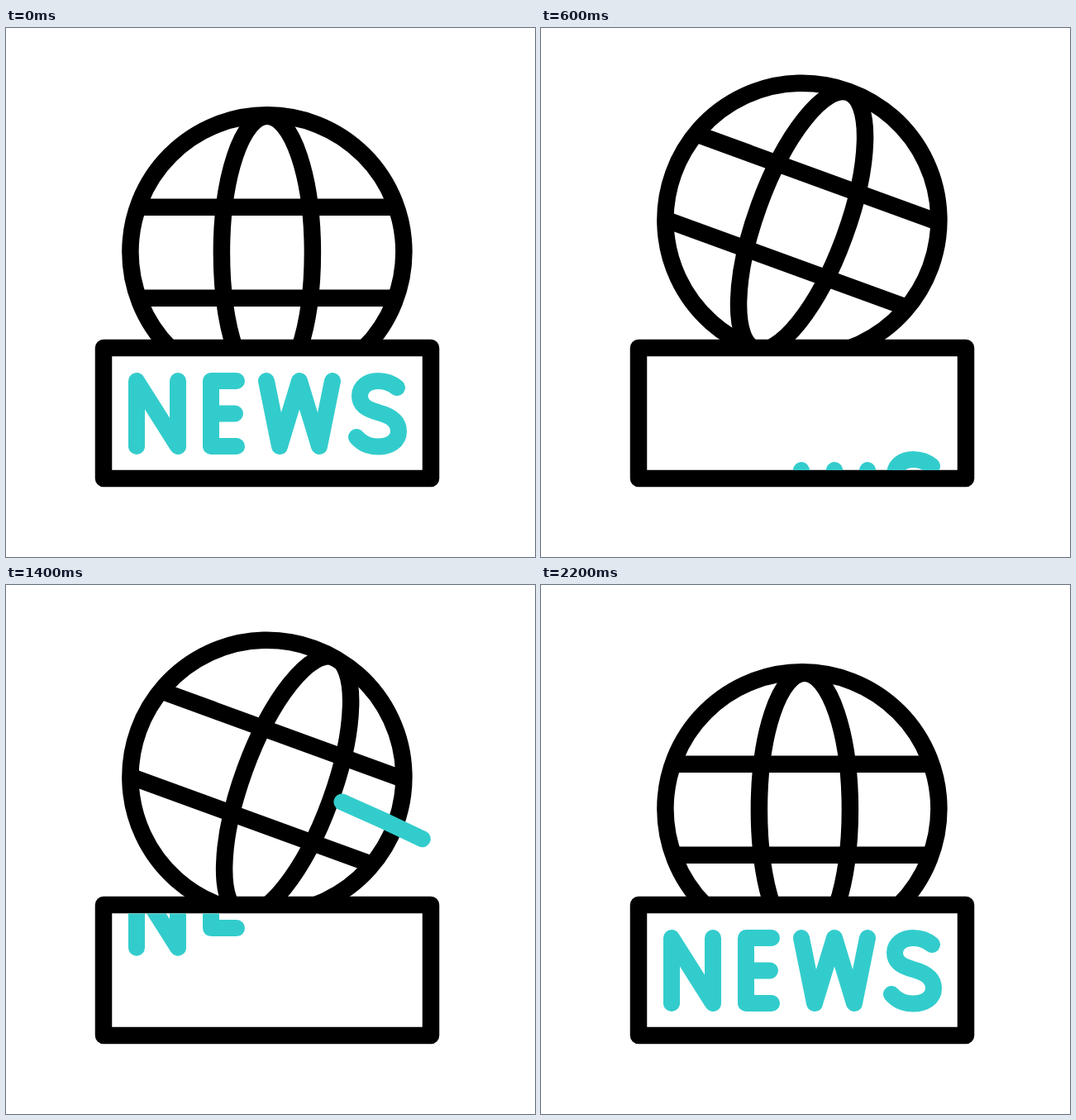
An HTML page for the animation above (2.42 s loop, 640x640 px).

```html
<!DOCTYPE html>
<html lang="en">
<head>
<meta charset="utf-8">
<title>News globe</title>
<style>
  html, body { margin: 0; width: 100%; height: 100%; overflow: hidden; background: #fff; }
  svg { display: block; width: 100vw; height: 100vh; fill: none; stroke: #000; stroke-width: 20.5; }
  .teal { stroke: #33cccc; stroke-width: 20; stroke-linecap: round; stroke-linejoin: round; }
</style>
</head>
<body>
<svg viewBox="0 0 640 640">
  <defs>
    <clipPath id="disc"><circle r="166"/></clipPath>
    <clipPath id="window"><rect x="128" y="397.5" width="376" height="137.5"/></clipPath>
  </defs>

  <g id="globe">
    <g clip-path="url(#disc)">
      <path d="M-170-54H170M-170 56H170"/>
      <g id="meridians">
        <ellipse cy="1" rx="55" ry="165"/>
        <ellipse cx="-222" cy="1" rx="55" ry="165"/>
      </g>
    </g>
    <circle r="165.5"/>
  </g>

  <rect x="118" y="387" width="396" height="158" fill="#fff" stroke-linejoin="round"/>

  <g class="teal" clip-path="url(#window)" role="img" aria-label="NEWS">
    <path class="letter" d="M158 506V427L208 506V427"/>
    <path class="letter" d="M279 427H248V506H279M248 466.5H277"/>
    <path class="letter" d="M315 427L331 506L355 427L379 506L395 427"/>
    <path class="letter" d="M473 435C467 430 459 427 450 427C438 427 428 434 428 445C428 456 436 461 450 465C465 469 475 475 475 488C475 500 464 506.5 450 506.5C439 506.5 430 502 424 495"/>
  </g>

  <path id="streak" class="teal" transform="translate(316 232.5) rotate(20)" d="M-200-2Q1-15 202 6" pathLength="100"/>
</svg>

<script>
  const LOOP = 2420, STEP = 20, LAST = 2200;
  const $ = id => document.getElementById(id);
  const globe = $('globe'), meridians = $('meridians'), streak = $('streak');
  const letters = document.querySelectorAll('.letter');

  const span = (t, from, to) => Math.min(1, Math.max(0, (t - from) / (to - from)));
  const sine = p => (1 - Math.cos(Math.PI * p)) / 2;
  const cubicIn = p => p ** 3;

  // Pulls back before the move and overshoots after it
  function back(p) {
    const c = 2.68, half = u => u * u * ((c + 1) * u - c) / 2;
    return p < 0.5 ? half(2 * p) : 1 - half(2 - 2 * p);
  }

  function letterShift(t, i) {
    if (t < 1000) return 140 * cubicIn(span(t, 84 + 20 * i, 603 + 20 * i));
    return -140 * cubicIn(1 - span(t, 1295 + 40 * i, 1780 + 40 * i));
  }

  function draw(t) {
    const tilt = sine(span(t, 0, 600)) - sine(span(t, 1600, 2200));
    globe.setAttribute('transform', `translate(315.9 ${270.8 - 38.5 * tilt}) rotate(${20 * tilt})`);
    meridians.setAttribute('transform', `translate(${225 * back(span(t, 690, 1630))} 0)`);

    letters.forEach((el, i) => el.setAttribute('transform', `translate(0 ${letterShift(t, i)})`));

    const head = 100 * sine(span(t, 1000, 1400));
    const tail = 100 * sine(span(t, 1138, 1538));
    streak.style.visibility = head > tail ? 'visible' : 'hidden';
    streak.setAttribute('stroke-dasharray', `${head - tail} 300`);
    streak.setAttribute('stroke-dashoffset', -tail);
  }

  const start = performance.now();
  function tick() {
    const t = (performance.now() - start) % LOOP;
    draw(Math.min(LAST, Math.floor(t / STEP) * STEP));
    requestAnimationFrame(tick);
  }
  tick();
</script>
</body>
</html>
```
